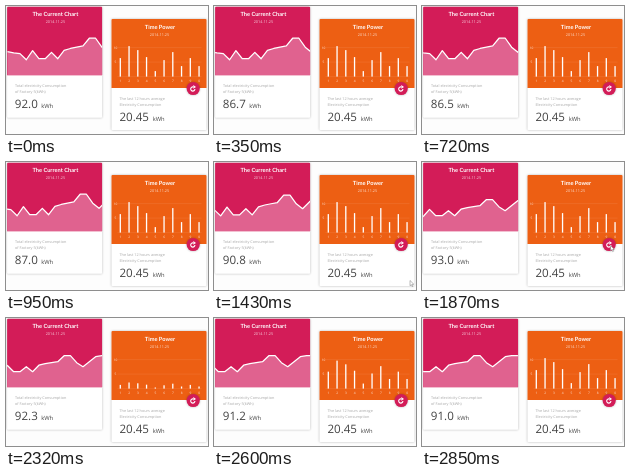
These frames come from a looping animation (202x128 px, 3030 ms). An HTML page:

```html
<!DOCTYPE html>
<html lang="en">
<head>
<meta charset="utf-8">
<title>Power cards</title>
<style>
  html, body { margin: 0; width: 100%; height: 100%; overflow: hidden; background: #fdfdfd; }
  svg { display: block; width: 100vw; height: 100vh; }
  text { font-family: "Open Sans", "Noto Sans", sans-serif; text-rendering: geometricPrecision; }
  .title { font: 700 5.7px Lato, "Open Sans", sans-serif; fill: #fff; text-anchor: middle; }
  .date { font-size: 3.8px; fill: #fff; fill-opacity: .8; text-anchor: middle; }
  .note { font-size: 3.8px; fill: #a6a6a6; }
  .value { font-size: 11.6px; fill: #444; }
  .unit { font-size: 5.8px; fill: #444; }
  .axis { font-size: 3.2px; fill: #fff; fill-opacity: .85; text-anchor: middle; }
  .card { fill: #fff; filter: drop-shadow(0 .8px 1px rgba(0, 0, 0, .28)); }
</style>
</head>
<body>
<svg viewBox="0 0 202 128">
  <defs>
    <clipPath id="plot"><rect x="1.5" y="28" width="95" height="41.5"/></clipPath>
  </defs>

  <g transform="translate(-.4 -.3)">
    <rect class="card" x="1.5" y="1" width="95" height="111" rx="1"/>
    <path d="M1.5 69.5V2q0-1 1-1h93q1 0 1 1v67.5z" fill="#d31c58"/>
    <text class="title" x="49.8" y="10.4">The Current Chart</text>
    <text class="date" x="49.8" y="17.8">2014.11.25</text>
    <g clip-path="url(#plot)">
      <path id="area" fill="#e0628f"/>
      <path id="line" fill="none" stroke="#fff" stroke-width="1.25" stroke-linejoin="round"/>
    </g>
    <text class="note" x="9.3" y="81.6">Total electricity Consumption</text>
    <text class="note" x="9.3" y="87.1">of Factory 5(kWh)</text>
    <text class="value" x="9.2" y="102.4" id="value">92.0</text>
    <text class="unit" x="35.6" y="102.4">kWh</text>
  </g>

  <g transform="translate(-.5 -.9)">
    <rect class="card" x="106" y="14" width="95" height="111" rx="1"/>
    <path d="M106 82.9V15q0-1 1-1h93q1 0 1 1v67.9z" fill="#ed5f13"/>
    <text class="title" x="154.5" y="23.6">Time Power</text>
    <text class="date" x="154" y="31">2014.11.25</text>
    <g id="grid" stroke="#fff" stroke-opacity=".18" stroke-width=".4"></g>
    <g id="bars" fill="#fff"></g>
    <g id="labels"></g>
    <text class="note" x="114" y="95">The last 12 hours average</text>
    <text class="note" x="114" y="100.5">Electricity Consumption</text>
    <text class="value" x="113.9" y="115.5">20.45</text>
    <text class="unit" x="147.2" y="115.5">kWh</text>
  </g>

  <g transform="translate(187.2 82.5)">
    <circle class="card" r="6.6" style="fill:#d31c58"/>
    <path d="M-.2 -1.6A2.1 2.1 0 1 0 1.7 .5" fill="none" stroke="#fff" stroke-width="1.1"/>
    <path d="M.1 -3.4L2.8 -1.6L.1 .2z" fill="#fff"/>
  </g>
  <path id="cursor" d="M0 0V5.3L1.3 4.2L2.2 6.1L3 5.7L2.2 3.8H3.8z"
    fill="#fff" stroke="#777" stroke-width=".5"/>
</svg>
<script>
  const LOOP = 3030, STEP = 500;
  const starts = [20, 715, 1300, 1815, 2345];
  const values = [92, 86.5, 87.1, 93.3, 92.3, 91];
  const levels = [48.5, 49.5, 50, 54.8, 47.7, 54, 54, 49, 54, 47.5, 46, 45, 44,
    38, 38, 45, 49, 44, 39, 38, 38];
  const LEFT = 1.8, GAP = 94.5 / 15, FLOOR = 69.5, PIVOT = 57.5;
  const tops = [53, 41, 45, 52, 66, 55, 47, 61, 53, 61];
  const BASE = 71.5;

  const $ = id => document.getElementById(id);
  const add = (parent, tag, attrs, text = "") => {
    const el = document.createElementNS("http://www.w3.org/2000/svg", tag);
    for (const key in attrs) el.setAttribute(key, attrs[key]);
    el.textContent = text;
    return $(parent).appendChild(el);
  };
  const part = (t, from, to) => Math.min(1, Math.max(0, (t - from) / (to - from)));
  const easeOut = p => 1 - (1 - p) ** 3;
  const swing = p => (1 - Math.cos(Math.PI * p)) / 2;
  const mix = (a, b, p) => a + (b - a) * p;

  const barX = i => 114.8 + i * 8.75;
  const bars = tops.map((y, i) => {
    add("labels", "text", { class: "axis", x: barX(i), y: 77 }, (i + 1) % 10);
    return add("bars", "rect", { x: barX(i) - .65, width: 1.3 });
  });
  [["10", 42.5], ["5", 57], ["0", BASE]].forEach(([label, y]) => {
    add("grid", "path", { d: `M112 ${y}H196` });
    if (y < BASE) add("labels", "text", { class: "axis", x: 110, y: y + 1 }, label);
  });

  function drawChart(t) {
    const steps = starts.map(s => part(t, s, s + STEP));
    const moves = steps.map(swing);
    const shift = moves.reduce((a, b) => a + b, 0);
    // The vertical axis rescales during the third step.
    const zoom = mix(1.28, 1, moves[2]);
    const x = i => LEFT + (i - shift) * GAP;
    const points = levels.map((y, i) =>
      `${x(i).toFixed(2)} ${(PIVOT + (y - PIVOT) * zoom).toFixed(2)}`);
    const d = "M" + points.join("L");
    $("line").setAttribute("d", d);
    $("area").setAttribute("d", `${d}L${x(levels.length - 1)} ${FLOOR}L${x(0)} ${FLOOR}z`);
    const value = steps.reduce(
      (v, p, i) => v + (values[i + 1] - values[i]) * easeOut(p), values[0]);
    $("value").textContent = value.toFixed(1);
  }

  function drawBars(t) {
    const size = t < 2280 ? 1 - swing(part(t, 1900, 2250)) : easeOut(part(t, 2280, 2850));
    bars.forEach((bar, i) => {
      const h = (BASE - tops[i]) * size;
      bar.setAttribute("y", BASE - h);
      bar.setAttribute("height", h);
    });
  }

  function drawCursor(t) {
    const come = swing(part(t, 1330, 1790)), go = swing(part(t, 1950, 2310));
    const x = mix(mix(197, 188.5, come), 203, go);
    const y = mix(mix(123, 83.5, come), 93, go);
    $("cursor").setAttribute("transform", `translate(${x} ${y})`);
    $("cursor").setAttribute("visibility", t >= 1280 && t < 2310 ? "visible" : "hidden");
  }

  function frame() {
    const t = performance.now() % LOOP;
    drawChart(t);
    drawBars(t);
    drawCursor(t);
    requestAnimationFrame(frame);
  }
  frame();
</script>
</body>
</html>
```
